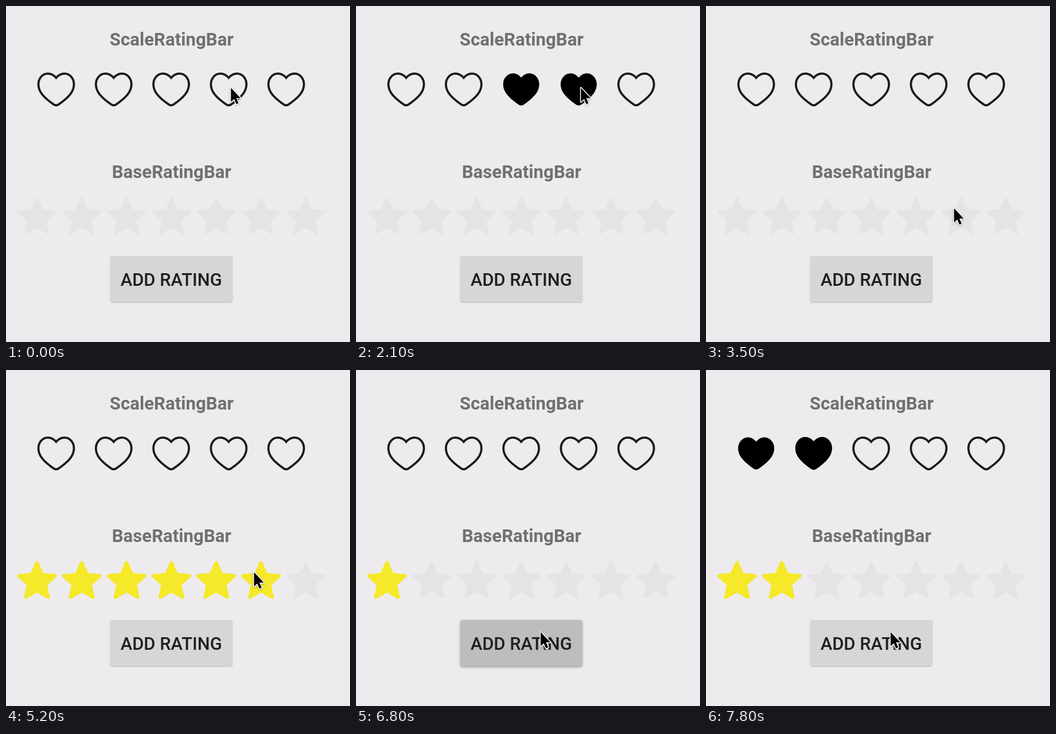
Write an HTML page that moves like this. It is 600x586 px and loops after 8000 ms.

```html
<!DOCTYPE html>
<html lang="en">
<head>
<meta charset="utf-8">
<title>Rating bars</title>
<style>
  html, body { margin: 0; width: 100%; height: 100%; overflow: hidden; background: #edebee; }
  svg { display: block; width: 600px; height: 586px; }
  text { font-family: Roboto, "Open Sans", sans-serif; text-anchor: middle; }
  .title { font-size: 31.2px; font-weight: 700; fill: #707072; }
  .label { font-size: 30.9px; font-weight: 500; fill: #1f1e20; }
  #hearts { filter: blur(.5px); }
  .heart { fill: none; stroke: #1b1a1d; stroke-width: 3.8; }
  .heart.on { fill: #000; stroke: #000; stroke-width: 1; }
  .star { fill: #e5e3e6; stroke: #e5e3e6; stroke-width: 4.4; stroke-linejoin: round; }
  .star.on { fill: #f5e92a; stroke: #f5e92a; stroke-width: 6; }
  #cursor path { fill: #000; stroke: #fff; stroke-width: 3; stroke-linejoin: round; paint-order: stroke; }
  #cursor { filter: drop-shadow(0 1.5px 1.5px rgba(0, 0, 0, .3)); }
</style>
</head>
<body>
<svg viewBox="0 0 600 586">
  <text class="title" x="288.8" y="69">ScaleRatingBar</text>
  <text class="title" x="288.8" y="300">BaseRatingBar</text>
  <g id="hearts"></g>
  <g id="stars"></g>
  <rect id="button" x="182" y="436" width="212.6" height="80" rx="4"/>
  <text class="label" x="288.2" y="487.5">ADD RATING</text>
  <g id="cursor"><path d="M0 0V24.6L5.6 19.6L9.4 28.4L13.3 26.7L9.4 18H17Z"/></g>
</svg>
<script>
const LOOP = 8000, STEP = 100, FADE = 400, POP = 380;
const FILL_DELAY = 15, CLEAR_DELAY = 5;
const $ = id => document.getElementById(id);
const mix = (a, b, k) => a + (b - a) * k;
const clamp = k => Math.min(1, Math.max(0, k));

const HEART = "M0-20C-5-26-10-27.5-14.5-27.5C-24-27.5-31-19-31-9C-31 4-22 14-4 26.5" +
  "Q0 29 4 26.5C22 14 31 4 31-9C31-19 24-27.5 14.5-27.5C10-27.5 5-26 0-20Z";

const STAR = "M" + Array.from({ length: 10 }, (_, i) => {
  const r = i % 2 ? 15.4 : 33.2, a = i * Math.PI / 5;
  return (r * Math.sin(a)).toFixed(2) + " " + (-r * Math.cos(a)).toFixed(2);
}).join("L") + "Z";

function makeRow(parent, cls, d, count, x, gap, y) {
  return Array.from({ length: count }, (_, i) => {
    const el = document.createElementNS("http://www.w3.org/2000/svg", "path");
    el.setAttribute("d", d);
    el.setAttribute("class", cls);
    el.place = scale => el.setAttribute("transform",
      `translate(${x + i * gap} ${y}) scale(${scale})`);
    el.place(1);
    parent.append(el);
    return el;
  });
}

const hearts = makeRow($("hearts"), "heart", HEART, 5, 87.5, 100.3, 145.4);
const stars = makeRow($("stars"), "star", STAR, 7, 54, 78.15, 369.3);

// Each tap sets a rating; the button adds one to both bars.
const presses = [6800, 7400].map((at, i) => ({ at, rating: i + 1 }));
const heartTaps = [{ at: 650, rating: 4 }, { at: 2090, rating: 0 }, ...presses];
const starTaps = [{ at: 4200, rating: 6 }, { at: 5400, rating: 0 }, ...presses];

const easeOut = k => 1 - (1 - k) ** 3.4;
const easeInOut = k => k * k * (3 - 2 * k);
const REST = [[392.3, 142.7], [432.6, 352.8], [322, 457]];
const moves = [
  { start: 2600, end: 3500, ease: easeOut, bow: -19 },
  { start: 5900, end: 6400, ease: easeInOut, bow: 0 }
];

const latest = (taps, t) => taps.filter(tap => tap.at <= t).pop();

// Hearts switch one after another, a short delay apart.
function heartOn(i, t) {
  const wait = tap => (i + 1) * (tap.rating ? FILL_DELAY : CLEAR_DELAY);
  const tap = heartTaps.filter(p => p.at + wait(p) <= t).pop();
  return !!tap && i < tap.rating;
}

// The last heart of a new rating swells and settles.
function heartScale(i, t) {
  const tap = latest(heartTaps, t);
  if (!tap || i !== tap.rating - 1) return 1;
  const age = t - tap.at - tap.rating * FILL_DELAY;
  return 1 + .23 * Math.sin(Math.PI * clamp(age / POP));
}

function paintButton(t) {
  const press = latest(presses, t);
  const k = press ? 1 - clamp((t - press.at) / FADE) ** 2 : 0;
  const c = Math.round(mix(214, 189, k));
  const button = $("button");
  button.style.fill = `rgb(${c},${c - 1},${c + 1})`;
  button.style.filter =
    `drop-shadow(0 ${mix(1, 2, k)}px ${mix(.8, 2, k)}px rgba(0,0,0,${mix(.25, .35, k)}))`;
}

function moveCursor(t) {
  let [x, y] = REST[0];
  moves.forEach(({ start, end, ease, bow }, i) => {
    const k = ease(clamp((t - start) / (end - start)));
    x = mix(x, REST[i + 1][0], k) + bow * Math.sin(Math.PI * k);
    y = mix(y, REST[i + 1][1], k);
  });
  $("cursor").setAttribute("transform", `translate(${x} ${y})`);
}

function draw(time) {
  const t = Math.floor(time % LOOP / STEP) * STEP;
  const starTap = latest(starTaps, t);
  stars.forEach((el, i) => el.classList.toggle("on", !!starTap && i < starTap.rating));
  hearts.forEach((el, i) => {
    el.classList.toggle("on", heartOn(i, t));
    el.place(heartScale(i, t));
  });
  paintButton(t);
  moveCursor(t);
}

const begin = performance.now();
function tick() {
  draw(performance.now() - begin);
  requestAnimationFrame(tick);
}
tick();
</script>
</body>
</html>
```
